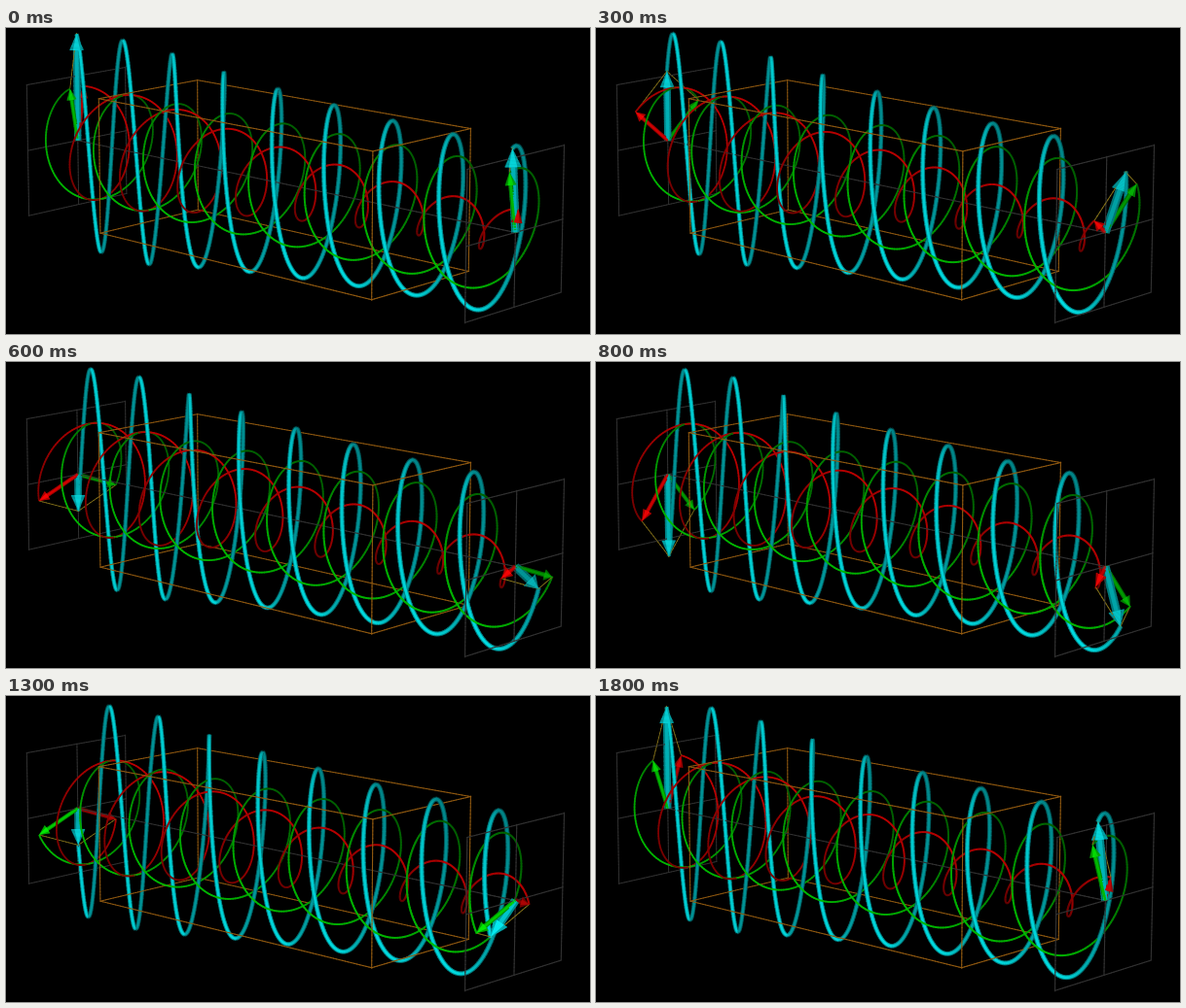
These frames come from a looping animation (600 by 315 pixels, 1.9 s). A matplotlib script:

```python
import numpy as np
import matplotlib.pyplot as plt
from matplotlib.animation import FuncAnimation
from matplotlib.collections import LineCollection

W, H, DPI = 600, 315, 100
FRAMES, INTERVAL = 19, 100
END, BOX = 8, 5            # half lengths of the axis and of the absorbing box
AMP, WAVELENGTH = 0.835, 2
UNIT = 72                  # pixels per world unit at the centre

CYAN, GREEN, RED = (0, 205, 210), (0, 205, 0), (215, 0, 0)
GREY, ORANGE, YELLOW = (50, 50, 50), (146, 90, 16), (135, 116, 26)

# Screen corners per cross-section: near top, near bottom, far top, far bottom
CORNERS = {
    -END: [(21, 58), (24, 193.5), (123, 41), (123.5, 170)],
    -BOX: [(95.5, 72.5), (97, 211.5), (196.5, 54), (197, 187)],
    BOX: [(377, 127), (376, 280), (478, 103.5), (475, 250)],
    END: [(472.5, 145), (472, 303.5), (574, 121), (570, 272)],
}
SIDES = [(-1, 1), (-1, -1), (1, 1), (1, -1)]


def solve_camera():
    """Least-squares perspective matrix from the known corners."""
    rows, rhs = [], []
    for x, screen in CORNERS.items():
        for (y, z), (u, v) in zip(SIDES, screen):
            p = [x, y, z]
            rows.append(p + [1, 0, 0, 0, 0] + [-u * c for c in p])
            rows.append([0, 0, 0, 0] + p + [1] + [-v * c for c in p])
            rhs += [u, v]
    m = np.linalg.lstsq(np.array(rows, float), np.array(rhs), rcond=None)[0]
    return np.append(m, 1).reshape(3, 4)


CAMERA = solve_camera()


def strip(pts, width, color, bias=0.0):
    """Project a polyline into depth-tagged segments."""
    pts = np.asarray(pts, float)
    n = len(pts) - 1
    q = np.c_[pts, np.ones(n + 1)] @ CAMERA.T
    uv = q[:, :2] / q[:, 2:]
    depth = (q[1:, 2] + q[:-1, 2]) / 2
    ends = uv[1:] + 0.25 * (uv[1:] - uv[:-1])
    segs = np.stack([uv[:-1], ends], axis=1)
    widths = np.broadcast_to(width, n) * UNIT / depth * 72 / DPI
    colors = np.broadcast_to(np.asarray(color, float) / 255, (n, 3))
    return segs, widths, np.clip(colors, 0, 1), depth + bias


def line(a, b, color, width=0.014, n=40):
    t = np.linspace(0, 1, n + 1)[:, None]
    return strip(np.array(a) * (1 - t) + np.array(b) * t, width, color)


def frame_rect(x, color):
    c = [(x, -1, -1), (x, 1, -1), (x, 1, 1), (x, -1, 1)]
    return [line(c[i], c[(i + 1) % 4], color) for i in range(4)]


def scenery():
    parts = [line((-END, 0, 0), (END, 0, 0), GREY, n=120)]
    for x in (-END, END):
        parts += frame_rect(x, GREY)
        parts += [line((x, -1, 0), (x, 1, 0), GREY),
                  line((x, 0, -1), (x, 0, 1), GREY)]
    for x in (-BOX, BOX):
        parts += frame_rect(x, ORANGE)
    parts += [line((-BOX, y, z), (BOX, y, z), ORANGE, n=100) for y, z in SIDES]
    return parts


def waves(x, theta):
    """Green, red and summed field vectors at x."""
    phi = theta - 2 * np.pi / WAVELENGTH * (x + END)
    weak = AMP * np.exp(-np.clip((x + BOX) / (2 * BOX), 0, 1))
    s, c = np.sin(phi), np.cos(phi)
    green = np.stack([x, AMP * s, AMP * c], axis=-1)
    red = np.stack([x, -weak * s, weak * c], axis=-1)
    both = np.stack([x, (AMP - weak) * s, (AMP + weak) * c], axis=-1)
    return green, red, both


def shaded(pts, color, base, depth):
    """Darken where the curve runs up and to the left."""
    d = np.diff(pts[:, 1:], axis=0)
    d /= np.linalg.norm(d, axis=1)[:, None] + 1e-9
    light = base - depth * (d[:, 1] - d[:, 0]) / np.sqrt(2)
    return light[:, None] * np.array(color)


def tube(pts):
    full = shaded(pts, CYAN, 0.82, 0.2)
    return [strip(pts, 0.063, full * 0.66, 0.002),
            strip(pts, 0.035, full * 1.05)]


def arrow(tip, color, shaft, head, head_len):
    tip = np.array(tip)
    base = np.array([tip[0], 0, 0])
    length = np.linalg.norm(tip - base)
    if length < 1e-6:
        return []
    size = min(1, length / head_len)
    neck = tip - (tip - base) * size * head_len / length
    t = np.linspace(0, 1, 15)[:, None]
    cone = neck * (1 - t) + tip * t
    taper = head * size * (1 - (t[1:, 0] + t[:-1, 0]) / 2)
    color = np.array(color) * (0.9 - 0.16 * tip[1] / length)
    parts = [strip(cone, taper, color * 0.85, -0.002),
             strip(cone, taper * 0.5, color * 1.1 + 5, -0.003)]
    if size == 1:
        t = np.linspace(0, 1, 21)[:, None]
        rod = base * (1 - t) + neck * t
        parts += [strip(rod, shaft, color * 0.7),
                  strip(rod, shaft * 0.5, color * 0.95, -0.001)]
    return parts


def vectors(x, theta):
    green, red, both = waves(np.float64(x), theta)
    parts = [line(green, both, YELLOW, 0.012, 12),
             line(red, both, YELLOW, 0.012, 12)]
    parts += arrow(green, GREEN, 0.06, 0.15, 0.18)
    parts += arrow(red, RED, 0.06, 0.15, 0.18)
    return parts + arrow(both, CYAN, 0.11, 0.22, 0.25)


def angle(i):
    """Phase in radians; the playback speed is slightly uneven."""
    return np.radians(np.interp(i, [0, 3, 6, 8, 11, 13, 18],
                                [-10, 50, 110, 140, 200, 250, 340]))


fig = plt.figure(figsize=(W / DPI, H / DPI), dpi=DPI, facecolor="black")
ax = fig.add_axes([0, 0, 1, 1])
ax.set_xlim(0, W)
ax.set_ylim(H, 0)
ax.axis("off")

STATIC = scenery()
XS = np.linspace(-END, END, 1001)
art = LineCollection([], snap=False)
ax.add_collection(art, autolim=False)


def draw(i):
    theta = angle(i)
    green, red, both = waves(XS, theta)
    parts = STATIC + tube(both)
    parts.append(strip(green, 0.026, shaded(green, GREEN, 0.68, 0.22)))
    parts.append(strip(red, 0.026, shaded(red, RED, 0.72, 0.16)))
    parts += vectors(-END, theta) + vectors(END, theta)
    segs, widths, colors, depth = (np.concatenate(p) for p in zip(*parts))
    order = np.argsort(-depth, kind="stable")
    art.set_segments(segs[order])
    art.set_linewidths(widths[order])
    art.set_colors(colors[order])
    return [art]


anim = FuncAnimation(fig, draw, frames=FRAMES, interval=INTERVAL,
                     repeat=True, repeat_delay=0)
plt.show()
```
